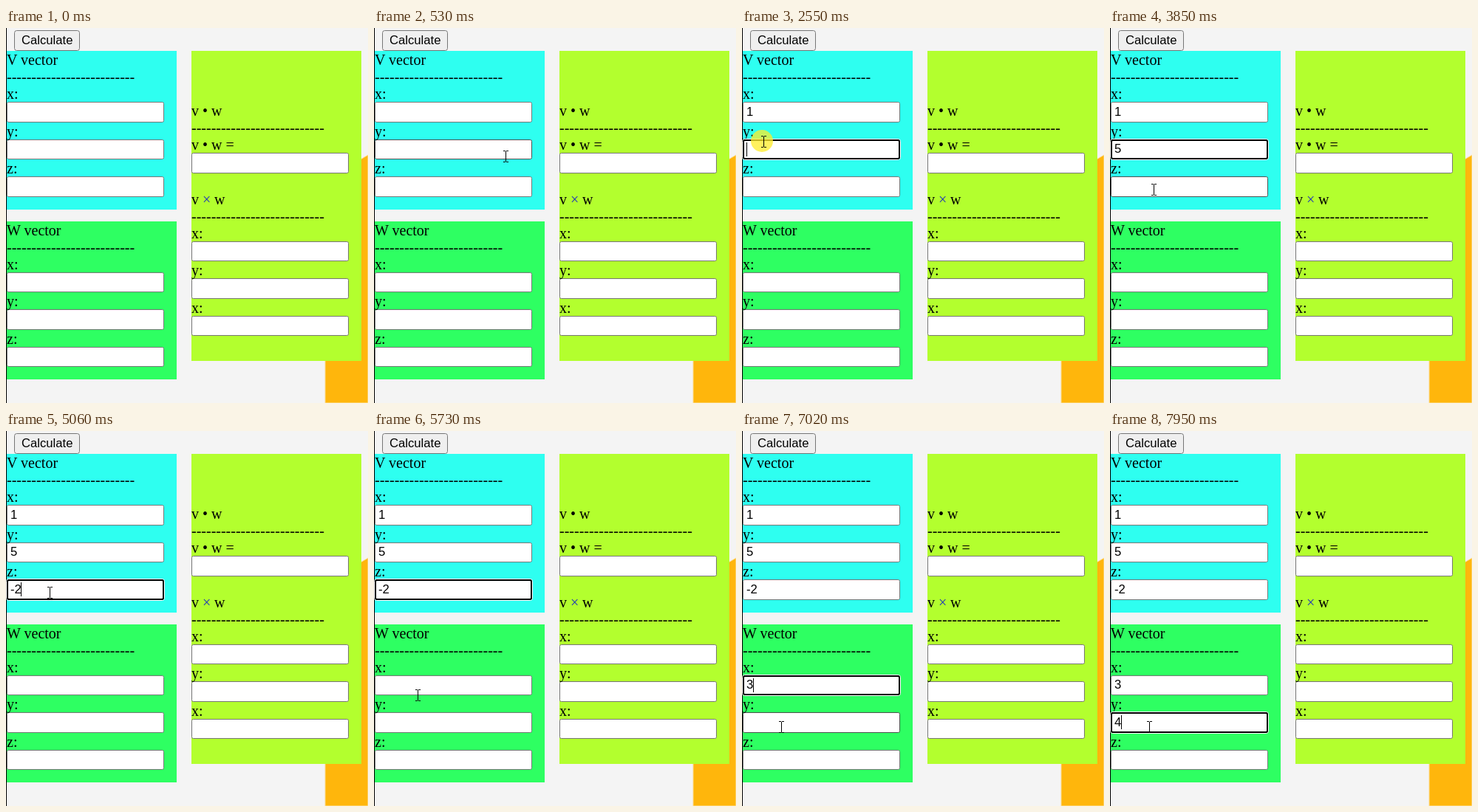
Recreate the animation shown at these times as an HTML page. Size 490x508 px, loop 8000 ms.

```html
<!DOCTYPE html>
<html lang="en">
<head>
<meta charset="utf-8">
<title>Vector calculator</title>
<style>
  html, body { margin: 0; width: 100%; height: 100%; overflow: hidden; background: #f4f4f4; }
  svg { display: block; width: 490px; height: 508px; }
  text { white-space: pre; }
  .label { font: 20px "Liberation Serif", "Times New Roman", serif; }
  .ui { font: 16.67px "Liberation Sans", Arial, sans-serif; }
</style>
</head>
<body>
<svg id="stage" viewBox="0 0 490 508" xmlns="http://www.w3.org/2000/svg"></svg>
<script>
const LOOP = 8000, BLINK = 500, PRESS = 130, KEY = 530;
const LINE = 23, ROW = 50.5, BOX = 27.5;
const stage = document.getElementById('stage');

function add(tag, attrs, text) {
  const el = document.createElementNS('http://www.w3.org/2000/svg', tag);
  stage.appendChild(el);
  if (text) el.textContent = text;
  return set(el, attrs);
}
function set(el, attrs) {
  for (const k in attrs) el.setAttribute(k, attrs[k]);
  return el;
}
const show = (el, on) => set(el, { visibility: on ? 'visible' : 'hidden' });
const rect = (x, y, width, height, fill, more) => add('rect', { x, y, width, height, fill, ...more });
const label = (x, y, s, fill = '#000') => add('text', { x, y, fill, class: 'label' }, s);

// An input box; its edges snap to whole pixels
function input(x, top) {
  const y = Math.round(top), h = Math.round(top + BOX) - y;
  const box = rect(x + .5, y + .5, 212, h - 1, '#fff', { rx: 2 });
  const value = add('text', { x: x + 5, y: Math.floor(y + h / 2 + 5), class: 'ui' });
  return { x, y, h, box, value };
}
// Three named inputs below each other
const group = (x, top, names) => [...names].map((name, i) => {
  const f = input(x, top + i * ROW);
  label(x, f.y - 4, name + ':');
  return f;
});

// Page
add('path', { d: 'M432 508V206L490 172V508Z', fill: '#ffb60c', stroke: '#fbdf9c' });
rect(0, 0, 1, 508, '#000');
rect(11.5, 3.5, 88, 27, '#efefef', { stroke: '#767676', rx: 3 });
add('text', { x: 21, y: 22, class: 'ui' }, 'Calculate');

function panel(name, top, fill) {
  const y = Math.round(top);
  rect(1, y, 230, Math.round(top + 214.4) - y, fill);
  label(1, y + 19, name + ' vector');
  label(1, y + 19 + LINE, '-'.repeat(26));
  return group(1, top + 69, 'xyz');
}
const fields = [...panel('V', 31.2, '#2efff0'), ...panel('W', 261.9, '#2eff62')];

rect(251, 31, 230, 420, '#b3ff2e');
const dotY = 119, crossY = 239;
label(251, dotY, 'v • w');
label(251, dotY + 2 * LINE, 'v • w =');
label(251, crossY, 'v');
label(266, crossY, '×', '#2038b8');
label(282, crossY, 'w');
for (const y of [dotY, crossY]) label(251, y + LINE, '-'.repeat(27));
const results = [input(251, 169.2), ...group(251, 288.9, 'xyx')];
const inputs = [...fields, ...results];

// Moving parts
const halo = rect(.5, 0, 214, 0, 'none', { stroke: '#fff', rx: 3 });
const ring = rect(2, 0, 211, 0, 'none', { stroke: '#000', 'stroke-width': 2, rx: 2 });
const caret = rect(6, 0, 1, 19, '#000');
const spot = add('circle', { r: 15, fill: '#ffec28', 'fill-opacity': .75 });
const beam = add('path', {
  d: 'M-3-7.5H0M1-7.5H4M.5-7V7M-3 7.5H0M1 7.5H4',
  fill: 'none', stroke: '#000'
});
const arrow = add('path', { d: 'M0 0V15L3.5 12L6 17.5L8.3 16.5L6 11H10.5Z', fill: '#fff', stroke: '#000' });

// One visit per field: the pointer travels there, clicks, then keys follow
const entry = { x: 325, y: 437 };
const visits = [
  { from: 190, to: 660, click: 930, x: 145, y: 114, bow: 0, keys: '1' },
  { from: 1870, to: 2470, click: 2480, x: 29, y: 154, bow: 0, keys: '5' },
  { from: 3310, to: 3830, click: 3990, x: 59, y: 219, bow: 0, keys: '-2' },
  { from: 5090, to: 5870, click: 6010, x: 59, y: 349, bow: 75, keys: '3' },
  { from: 6400, to: 7000, click: 7220, x: 53, y: 401, bow: 45, keys: '4' }
];

function pointer(t) {
  let i = visits.length - 1;
  while (i > 0 && visits[i].from > t) i--;
  const a = visits[i - 1] || entry, b = visits[i];
  const u = Math.min(1, Math.max(0, (t - b.from) / (b.to - b.from)));
  const k = u * u * (3 - 2 * u);
  return {
    x: Math.round(a.x + (b.x - a.x) * k),
    y: Math.round(a.y + (b.y - a.y) * k + b.bow * Math.sin(Math.PI * k))
  };
}

const advance = s => [...s].reduce((w, c) => w + (c === '-' ? 5.55 : 9.27), 0);
const inside = (f, p) => p.x > f.x && p.x < f.x + 213 && p.y > f.y && p.y < f.y + f.h;

function focus(f, text, since) {
  set(halo, { y: f.y - .5, height: f.h + 1 });
  set(ring, { y: f.y + 1, height: f.h - 2 });
  set(caret, { x: Math.floor(6 + advance(text)), y: f.y + 4 });
  show(caret, Math.floor(since / BLINK) % 2 === 0);
}

function draw(t) {
  const p = pointer(t), seen = t >= visits[0].from;
  const isText = p.x < 231 || results.some(f => inside(f, p));
  for (const f of inputs) set(f.box, { stroke: seen && inside(f, p) ? '#4f4f4f' : '#767676' });

  const active = visits.some(v => t >= v.click);
  for (const el of [halo, ring, caret]) show(el, active);
  visits.forEach((v, i) => {
    const age = t - v.click;
    const typed = Math.max(0, Math.min(v.keys.length, Math.floor(age / KEY)));
    const text = v.keys.slice(0, typed);
    fields[i].value.textContent = text;
    if (age >= 0) focus(fields[i], text, age - typed * KEY);
  });

  show(beam, seen && isText);
  show(arrow, seen && !isText);
  for (const el of [beam, arrow]) set(el, { transform: `translate(${p.x} ${p.y})` });
  show(spot, visits.some(v => t >= v.click && t < v.click + PRESS));
  set(spot, { cx: p.x - 2, cy: p.y - 1 });
}

const start = performance.now();
function tick(now) {
  draw(Math.max(0, now - start) % LOOP);
  requestAnimationFrame(tick);
}
draw(0);
requestAnimationFrame(tick);
</script>
</body>
</html>
```
